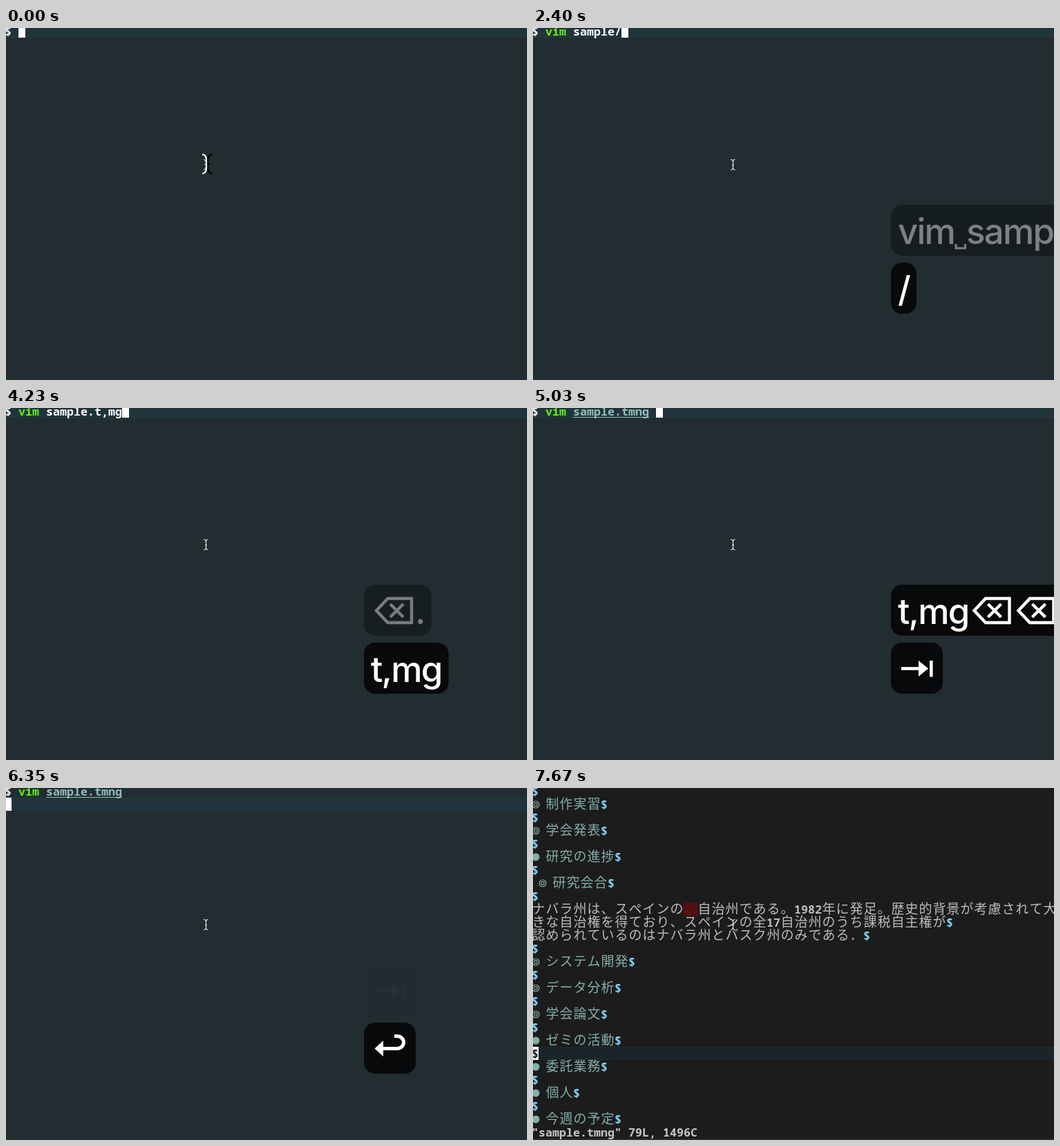
These frames come from a looping animation (754x510 px, 8 s). An HTML page with a canvas:

```html
<!DOCTYPE html>
<html lang="ja">
<head>
<meta charset="utf-8">
<title>Terminal session</title>
<style>
  html, body { margin: 0; width: 100%; height: 100%; overflow: hidden; background: #222d32; }
  canvas { display: block; }
</style>
</head>
<body>
<canvas id="stage" width="754" height="510"></canvas>
<script>
const ctx = document.getElementById('stage').getContext('2d');
const LOOP = 8000;
const COL = 10, ROW = 19, LEFT = -2, TOP = -5;
const MONO = 'bold 16.67px "Noto Sans Mono", "DejaVu Sans Mono", monospace';
const KANJI = '19px "Noto Sans CJK JP", "Noto Sans CJK", sans-serif';
const CAPTION = '500 51px Inter, Roboto, sans-serif';
const COMMAND = 'vim sample.tmng';
const ENTER = 6090, CLEAR = 6520, EDITOR = 6700;

// Each caption row: its keys, when they are pressed, and when it starts to fade.
const captions = [
  { keys: 'vim␣sample', at: [360, 450, 540, 630, 900, 980, 1070, 1160, 1240, 1330], fade: 1970 },
  { keys: '/', at: [2050], fade: 2820 },
  { keys: '⌫.', at: [2920, 3010], fade: 3785 },
  { keys: 't,mg⌫⌫⌫', at: [3800, 3890, 3980, 4060, 4240, 4320, 4410], fade: 5170 },
  { keys: '⇥', at: [5030], fade: 5620 },
  { keys: '⏎', at: [ENTER], fade: 6900 }
];
const FADE = 800;

const icons = {
  '␣': { width: 17, line: 3, stroke: 'M2 -1V5H15.5V-1' },
  '⌫': { width: 64, line: 4.4, stroke: 'M8 -20.5L24.5 -38H59V-3H24.5ZM28 -30L47 -11M47 -30L28 -11' },
  '⇥': { width: 55, line: 4.6, stroke: 'M5 -20.5H32M48.3 -32V-8.5', fill: 'M30 -32L44 -20.5L30 -9Z' },
  '⏎': { width: 55, line: 5, stroke: 'M17 -20.5H38A9.5 9 0 0 0 38 -38.5H34', fill: 'M5.5 -20.5L18 -32V-9Z' }
};

const lines = [
  '', '◎ 制作実習', '', '◎ 学会発表', '', '● 研究の進捗', '', ' ◎ 研究会合', '',
  'ナバラ州は、スペインの　自治州である。1982年に発足。歴史的背景が考慮されて大',
  'きな自治権を得ており、スペインの全17自治州のうち課税自主権が',
  '認められているのはナバラ州とバスク州のみである．',
  '', '◎ システム開発', '', '◎ データ分析', '', '◎ 学会論文', '', '● ゼミの活動',
  '', '● 委託業務', '', '● 個人', '', '● 今週の予定'
];

const cellX = col => LEFT + col * COL;
const cellY = row => TOP + row * ROW;

function rect(x, y, w, h, color) {
  ctx.fillStyle = color;
  ctx.fillRect(x, y, w, h);
}

function bullet(x, y, hollow) {
  const disc = (radius, method) => {
    ctx.beginPath();
    ctx.arc(x, y, radius, 0, Math.PI * 2);
    ctx[method]();
  };
  ctx.strokeStyle = ctx.fillStyle;
  ctx.lineWidth = 1.2;
  if (hollow) {
    disc(5, 'stroke');
    disc(2.3, 'stroke');
  } else {
    disc(5.5, 'fill');
  }
}

// Draws text on the character grid and returns the column after it.
function write(text, col, row, color) {
  ctx.fillStyle = color;
  for (const char of text) {
    const x = cellX(col), y = cellY(row);
    const wide = char > '\u2e80';
    if (char === '◎' || char === '●') {
      bullet(x + 6, y + 10, char === '◎');
    } else {
      ctx.font = wide ? KANJI : MONO;
      ctx.fillText(char, x + (wide ? 0.5 : 0), y + 16);
    }
    col += wide ? 2 : 1;
  }
  return col;
}

function guide(row, color = '#20343c', edge = '#213a43') {
  rect(0, cellY(row), 754, ROW, edge);
  rect(0, cellY(row) + 1, 754, ROW - 2, color);
}

function cursor(col, row, char = '') {
  rect(cellX(col), cellY(row), COL, ROW, '#fff');
  write(char, col, row, '#111');
}

function typedLine(t) {
  if (t >= 5030) return COMMAND + ' ';
  let line = '';
  for (const { keys, at } of captions) {
    [...keys].forEach((key, i) => {
      if (t < at[i]) return;
      line = key === '⌫' ? line.slice(0, -1) : line + (key === '␣' ? ' ' : key);
    });
  }
  return line;
}

function drawShell(t) {
  const entered = t >= ENTER;
  const line = typedLine(t);
  const name = line.slice(0, 3).trim();
  const arg = line.slice(4).trim();
  const isPath = arg && COMMAND.slice(4).startsWith(arg);
  const hint = line && COMMAND.startsWith(line) ? COMMAND.slice(line.length) : '';
  const end = 2 + line.length;

  guide(entered ? 1 : 0);
  write('$', 0, 0, '#fff');
  write(name, 2, 0, name === 'v' ? '#f0524f' : '#5ff014');
  write(arg, 6, 0, isPath ? '#8fbfb8' : '#fff');
  if (isPath) rect(cellX(6), 13, arg.length * COL, 1, '#8fbfb8');
  write(hint.slice(1), end + 1, 0, '#6b757b');
  if (entered) cursor(0, 1);
  else cursor(end, 0, hint[0]);
}

function drawStatus() {
  return write('"sample.tmng" 79L, 1496C', 0, 26, '#c6c6c6');
}

function drawEditor() {
  rect(0, 0, 754, 508, '#1c1c1c');
  guide(20, '#1a2529', '#1b2b31');
  rect(cellX(22), cellY(9), 2 * COL, ROW, '#560f0f');
  lines.forEach((text, row) => {
    const body = row >= 9 && row <= 11;
    const end = write(text, 0, row, body ? '#bcbcbc' : '#83afaa');
    if (row !== 9) write('$', end, row, '#87d7ff');
  });
  cursor(0, 20, '$');
  drawStatus();
}

function drawPointer(large) {
  ctx.lineWidth = large ? 2.2 : 1.2;
  const stroke = (path, color) => {
    ctx.strokeStyle = color;
    ctx.stroke(new Path2D(path));
  };
  if (large) {
    stroke('M298.5 183Q292 184 292 191V203Q292 210 298.5 211M292 197H296', '#000');
    stroke('M284 183Q290 184 290 191V203Q290 210 284 211', '#fff');
    ctx.lineWidth = 1;
    stroke('M286 190.5Q289 191 289 194M286 205.5Q289 205 289 202M287 197.5H290', '#fff');
  } else {
    stroke('M286 190.5Q289.5 190.5 289.5 194V202Q289.5 205.5 286 205.5M292.5 190.5Q289.5 190.5 289.5 194M292.5 205.5Q289.5 205.5 289.5 202M288 198.5H291', '#e4e7e8');
  }
}

function drawIcon(icon, x, y) {
  ctx.save();
  ctx.translate(x, y);
  ctx.lineWidth = icon.line;
  ctx.strokeStyle = '#fff';
  ctx.stroke(new Path2D(icon.stroke));
  if (icon.fill) ctx.fill(new Path2D(icon.fill));
  ctx.restore();
}

function drawCaption({ keys, at, fade }, t, raised) {
  const p = Math.min(1, Math.max(0, (t - fade) / FADE));
  const alpha = 1 - p * p * (3 - 2 * p);
  if (!alpha) return;
  const shown = [...keys].filter((_, i) => t >= at[i]);
  const y = raised ? 256 : 340;

  ctx.save();
  ctx.globalAlpha = alpha;
  ctx.font = CAPTION;
  ctx.letterSpacing = '-1.8px';
  const widthOf = key => icons[key]?.width ?? ctx.measureText(key).width;
  const width = shown.reduce((sum, key) => sum + widthOf(key), 20);
  ctx.fillStyle = 'rgba(0, 0, 0, .8)';
  ctx.beginPath();
  ctx.roundRect(518, y, width, 74, 16);
  ctx.fill();

  ctx.fillStyle = '#fff';
  let x = 528;
  for (const key of shown) {
    if (icons[key]) drawIcon(icons[key], x, y + 58);
    else ctx.fillText(key, x, y + 57);
    x += widthOf(key);
  }
  ctx.restore();
}

function draw(t) {
  rect(0, 0, 754, 510, '#222d32');
  if (t < CLEAR) {
    drawShell(t);
  } else if (t < EDITOR) {
    guide(26);
    cursor(drawStatus(), 26);
  } else {
    drawEditor();
  }
  drawPointer(t < 360);

  const started = captions.filter(caption => t >= caption.at[0]);
  started.slice(-2).forEach((caption, i, pair) => drawCaption(caption, t, i < pair.length - 1));
}

const start = performance.now();
function tick() {
  draw((performance.now() - start) % LOOP);
  requestAnimationFrame(tick);
}
tick();
</script>
</body>
</html>
```
